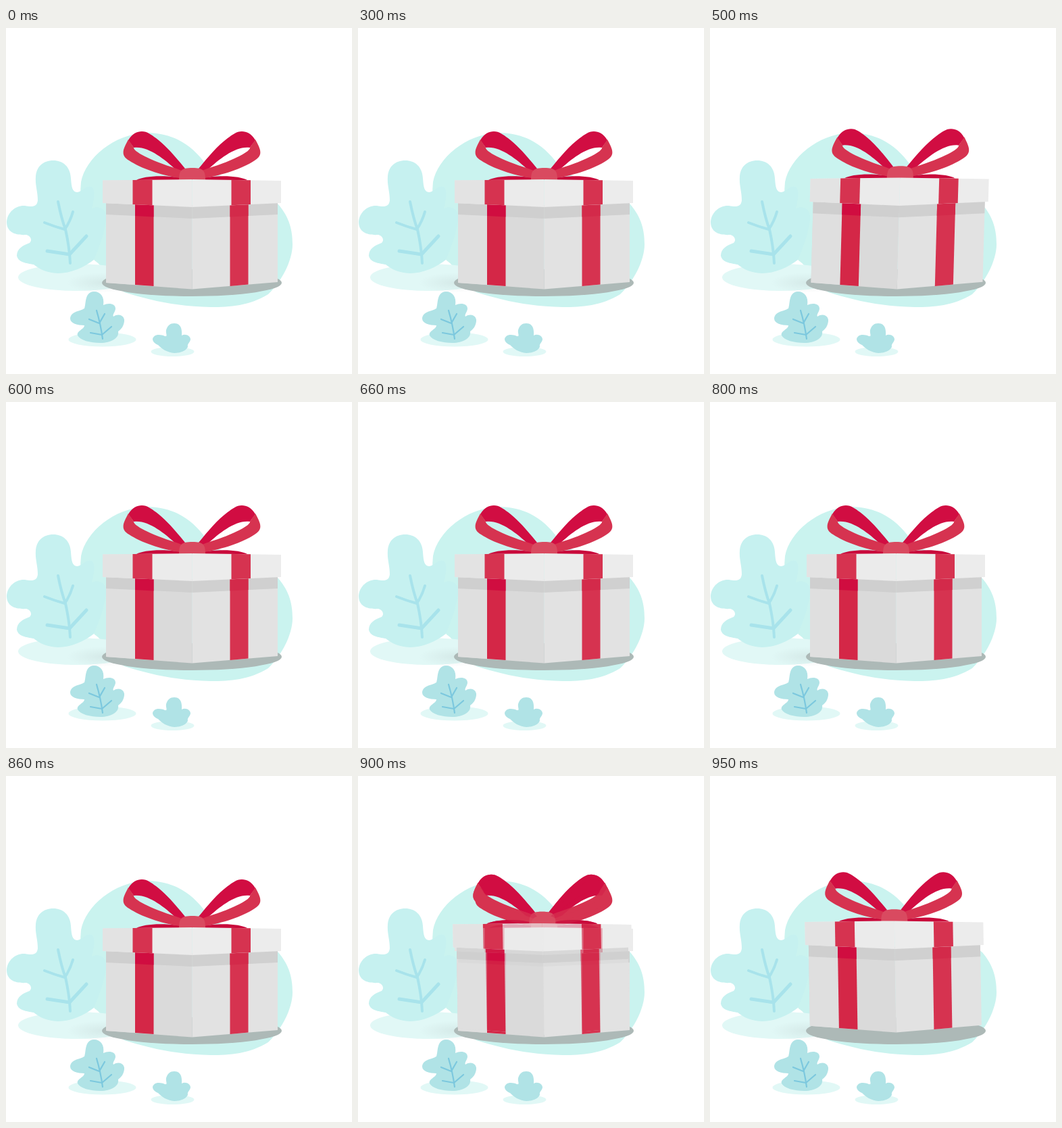
Animation, 512 px wide and 512 px high, one loop 1050 ms. Source, as an HTML page:

```html
<!DOCTYPE html>
<html lang="en">
<head>
<meta charset="utf-8">
<title>Gift box</title>
<style>
  html, body { margin: 0; width: 100%; height: 100%; overflow: hidden; background: #fff; }
  svg { display: block; width: 100vw; height: 100vh; }
  .vein { fill: none; stroke-linecap: round; stroke-linejoin: round; }
</style>
</head>
<body>
<svg viewBox="0 0 512 512">
  <defs>
    <radialGradient id="soft">
      <stop offset="0" stop-color="#aebcbc" stop-opacity=".22"/>
      <stop offset="1" stop-color="#aebcbc" stop-opacity="0"/>
    </radialGradient>

    <g id="loop">
      <path fill="#c90a3b" d="M193 225C203 219 232 217 262 222V226Z"/>
      <path fill="#d10d42" d="M181 166C187 156 194 153 201 153C209 153 215 158 222 163C237 174 251 191 265 208L258 214L251 209C234 194 210 174 189 177Z"/>
      <path fill="#d63350" d="M181 165L189 177C188 182 210 195 252 208L260 211L257 222C230 218 200 208 182 196C169 188 173 180 181 165Z"/>
    </g>

    <g id="gift">
      <use href="#loop"/>
      <use href="#loop" transform="matrix(-1 0 0 1 550 0)"/>
      <path fill="#d94a60" d="M256 225C256 211 259 207 276 207C292 207 295 211 295 225Z"/>

      <path fill="#dadada" d="M148 258L275.500 262V386.500L148 377Z"/>
      <path fill="#e2e2e2" d="M275.500 262L402 258V376L275.500 386.500Z"/>
      <path fill="#dfdfdf" d="M148 258H191V380L148 377Z"/>
      <path fill="#cfcfcf" d="M148 258L275.500 262V282L148 276Z"/>
      <path fill="#d0d0d0" d="M275.500 262L402 258V276L275.500 282Z"/>
      <path fill="#d42747" d="M191 260H218.500V382L191 380Z"/>
      <path fill="#d63350" d="M331.500 260H358.500V379.500L331.500 382Z"/>
      <path fill="#d00d40" d="M191 260H218.500V279.500L191 278Z"/>
      <path fill="#d32a4a" d="M331.500 260H358.500V278L331.500 279.500Z"/>

      <path fill="#ebebeb" d="M143 225.500L275.500 224V265L143 259Z"/>
      <path fill="#ececec" d="M275.500 224L407 226V259L275.500 265Z"/>
      <path fill="#e3e3e3" d="M143 225.500L188 225V261L143 259Z"/>
      <path fill="#d63350" d="M187.500 225L216.500 224.700V262.300L187.500 261Z"/>
      <path fill="#d63350" d="M333.500 224.900L362 225.300V261L333.500 262.300Z"/>
    </g>
  </defs>

  <path fill="#caf3ef" d="M207 155C250 155 276 175 296 202C330 235 372 235 403 261C420 281 424 300 424 320C424 345 407 376 388 394C360 411 332 413 303 413C250 412 210 402 175 391C156 378 146 354 131 344C117 322 107 270 111 228C118 192 160 157 207 155Z"/>

  <ellipse cx="105" cy="369" rx="87" ry="20" fill="#e1f8f6"/>
  <path fill="#c6f1f0" d="M70 196C84 196 95 205 96 222C97 236 98 243 106 243C114 241 119 232 127 235C133 240 130 255 127 267C138 262 150 268 148 284C145 306 138 324 130 343C116 354 96 363 77 363C59 362 50 357 41 350C30 348 18 347 16 337C16 326 25 322 35 318C39 314 37 308 30 306C15 307 1 303 1 287C2 272 15 262 28 263C39 265 46 265 47 255C47 241 43 233 44 220C45 205 55 196 70 196Z"/>
  <g class="vein" stroke="#a8e3eb" stroke-width="4">
    <path d="M77 257Q82 282 88 298Q94 325 95 348"/>
    <path d="M57 288Q72 294 87 298Q95 286 99 272"/>
    <path d="M61 330L94 335L119 308" stroke-width="5"/>
  </g>

  <ellipse cx="142" cy="377" rx="52" ry="15" fill="url(#soft)"/>
  <ellipse cx="275" cy="377" rx="133" ry="20" fill="#adb9b7"/>

  <use id="under" href="#gift"/>
  <use id="base" href="#gift"/>
  <use id="veil" href="#gift" opacity=".7"/>

  <ellipse cx="142.500" cy="461" rx="50" ry="10.500" fill="#e1f8f6"/>
  <path fill="#b0e3e6" d="M130 390C140 390 146 398 144 410C152 406 162 408 162 415C162 420 157 424 159 427C168 421 176 427 175 434C174 442 170 446 166 449C168 459 155 466 140 466C124 466 110 462 106 455C104 448 116 446 116 440C106 440 95 437 95 430C96 419 108 420 116 415C119 407 116 391 130 390Z"/>
  <g class="vein" stroke="#7cc8de" stroke-width="2.200">
    <path d="M134 418Q140 438 143 460"/>
    <path d="M123 431L138 437L146 423"/>
    <path d="M125 451L142 454L156 442"/>
  </g>

  <ellipse cx="246.500" cy="479" rx="32" ry="7" fill="#e1f8f6"/>
  <path fill="#b0e3e6" d="M249 437C257 437 261 443 260 455C265 452 273 455 273 461C272 466 268 467 269 472C266 478 258 481 249 481C238 480 231 475 225 469C220 467 217 464 217 460C219 453 228 453 235 456C240 457 236 452 237 447C239 440 243 437 249 437Z"/>
</svg>
<script>
  const LOOP = 1050, FLOOR = 386;
  const [under, base, veil] = ['under', 'base', 'veil'].map(id => document.getElementById(id));

  // lean: sideways shear, stretch: height factor, both anchored at the floor
  const pose = (lean = 0, stretch = 1, dx = 0, dy = 0) =>
    `matrix(1 0 ${-lean} ${stretch} ${dx + FLOOR * lean} ${FLOOR * (1 - stretch) + dy})`;

  const rest = pose();
  const right = pose(0.028, 1.016, 1.2);
  const left = pose(-0.0165, 1.016);
  const rise = pose(-0.0165, 1.016, 0, -3.5);
  const hop = pose(-0.0165, 1.016, 0, -7);

  const steps = [
    { until: 500, at: rest },
    { until: 600, at: right },
    { until: 700, at: rest },
    { until: 800, at: left },
    { until: 900, at: rest },
    { until: 950, at: rest, blend: rise },
    { until: LOOP, at: hop }
  ];

  // A blend keeps both outlines solid and mixes colours where they overlap
  function draw(t) {
    const { at, blend } = steps.find(s => t < s.until);
    base.setAttribute('transform', at);
    for (const copy of [under, veil]) {
      copy.setAttribute('transform', blend || at);
      copy.setAttribute('visibility', blend ? 'visible' : 'hidden');
    }
  }

  const start = performance.now();
  function tick() {
    draw((performance.now() - start) % LOOP);
    requestAnimationFrame(tick);
  }
  tick();
</script>
</body>
</html>
```
